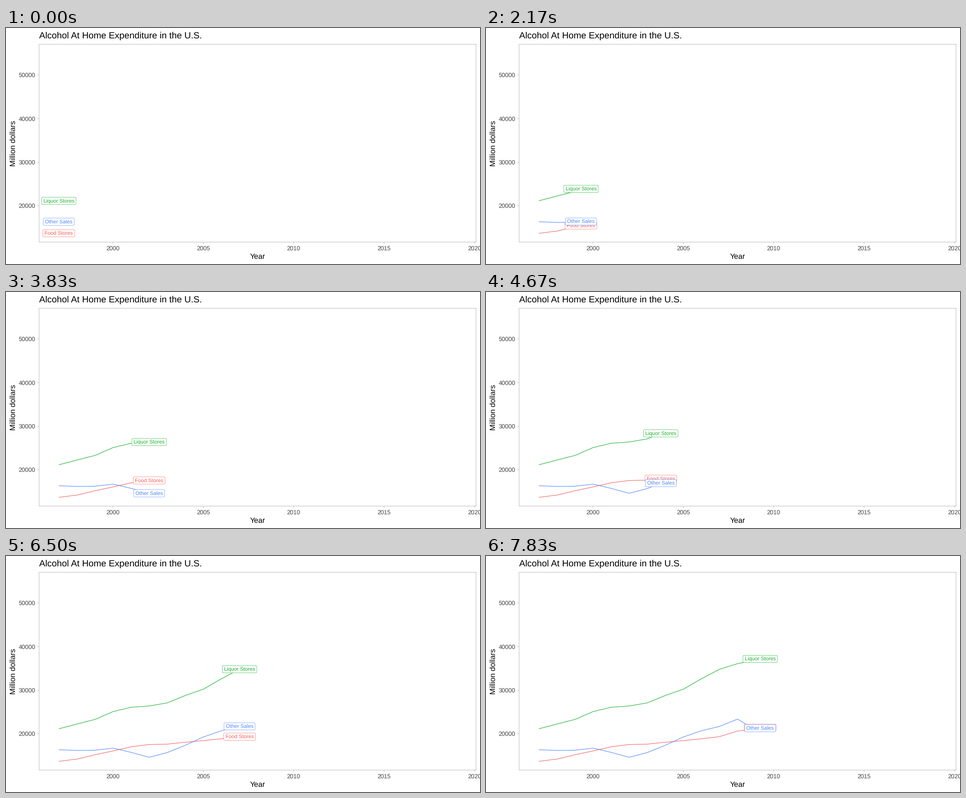
A matplotlib script that plays this animation: 1000x500 px, repeating every 8 s.

```python
import matplotlib.pyplot as plt
import numpy as np
from matplotlib.animation import FuncAnimation
from matplotlib.patches import FancyBboxPatch, Rectangle

W, H, DPI = 1000, 500, 100
LOOP_MS, FRAMES, HOLD = 8000, 48, 5
PX = 72 / DPI  # points per pixel
GREY, TICK_TEXT = "#B3B3B3", "#444444"
LEFT, RIGHT, TOP, BOTTOM = 69.5, 992, 34, 454

plt.rcParams.update({
    "font.family": "Liberation Sans",
    "text.hinting": "none",
    "toolbar": "None",
})

# Million dollars per year from 1997: name, colour, label width, values
SERIES = [
    ("Food Stores", "#F35E5A", 67.1,
     [13665, 14175, 15160, 16045, 16990, 17520, 17605,
      18040, 18430, 18840, 19330, 20615, 21050, 22370]),
    ("Liquor Stores", "#17B12B", 72.7,
     [21115, 22220, 23270, 25070, 26065, 26360, 27070,
      28770, 30215, 32615, 34780, 36080, 36870, 38035]),
    ("Other Sales", "#5086FF", 65.4,
     [16320, 16155, 16210, 16695, 15720, 14585, 15670,
      17345, 19255, 20670, 21680, 23345, 20865, 22490]),
]
YEARS = np.arange(1997, 2011)
# The full reveal spans 22 years in 74 steps; each year lands on a whole step.
YEAR_STEPS = np.round(np.arange(len(YEARS)) * 74 / 22)
BOX_H = 15.3


def x_px(year):
    return LEFT + (np.asarray(year) - 1995.9) * (RIGHT - LEFT) / 24.2


def y_px(value):
    return 376.5 - (np.asarray(value) - 20000) * 92.33 / 10000


fig = plt.figure(figsize=(W / DPI, H / DPI), dpi=DPI, facecolor="white")
ax = fig.add_axes([0, 0, 1, 1])
ax.set_xlim(0, W)
ax.set_ylim(H, 0)
ax.axis("off")


def text(x, y, s, size, color="black", **kw):
    return ax.text(x, y, s, fontsize=size * PX, color=color,
                   va="baseline", **kw)


def tick(xs, ys):
    ax.plot(xs, ys, color=GREY, lw=0.8 * PX, solid_capstyle="butt", snap=False)


def draw_axes():
    ax.add_patch(Rectangle((LEFT + 0.4, TOP + 0.4), RIGHT - LEFT - 0.8,
                           BOTTOM - TOP - 0.8, fill=False, ec=GREY,
                           lw=0.9 * PX, snap=False))
    for value in range(20000, 50001, 10000):
        y = float(y_px(value))
        tick([LEFT - 4, LEFT], [y, y])
        text(62.3, y + 4.6, str(value), 12.8, TICK_TEXT, ha="right")
    for year in range(2000, 2021, 5):
        x = float(x_px(year))
        tick([x, x], [BOTTOM, BOTTOM + 4])
        text(x, 471, str(year), 12.8, TICK_TEXT, ha="center")
    text(LEFT, 22, "Alcohol At Home Expenditure in the U.S.", 19.2)
    text((LEFT + RIGHT) / 2, 489, "Year", 16, ha="center")
    text(19.5, 244, "Million dollars", 16, ha="center",
         rotation=90, rotation_mode="anchor")


class Trace:
    """A line growing behind its label."""

    def __init__(self, order, name, color, width, values):
        self.values, self.width = values, width
        self.line, = ax.plot([], [], color=color, lw=1.07 * PX,
                             solid_capstyle="butt", solid_joinstyle="round",
                             zorder=3 + order)
        self.box = FancyBboxPatch(
            (0, 0), width, BOX_H, boxstyle="round,pad=0,rounding_size=2.2",
            fc="white", ec=color, lw=0.6 * PX, snap=False, zorder=10 + order)
        ax.add_patch(self.box)
        self.label = text(0, 0, name, 11, color, ha="center",
                          zorder=10.5 + order)

    def update(self, year):
        done = YEARS < year
        value = np.interp(year, YEARS, self.values)
        xs = np.append(YEARS[done], year)
        ys = np.append(np.array(self.values)[done], value)
        self.line.set_data(x_px(xs), y_px(ys))
        x, y = float(x_px(year)), float(y_px(value))
        self.box.set_bounds(x - self.width / 2, y - BOX_H / 2,
                            self.width, BOX_H)
        self.label.set_position((x, y + 4.1))


draw_axes()
traces = [Trace(i, *row) for i, row in enumerate(SERIES)]


def update(frame):
    year = np.interp(max(0, frame - HOLD), YEAR_STEPS, YEARS)
    for trace in traces:
        trace.update(year)
    return []


anim = FuncAnimation(fig, update, frames=FRAMES, interval=LOOP_MS / FRAMES,
                     init_func=lambda: update(0), repeat=True, repeat_delay=0)
plt.show()
```
